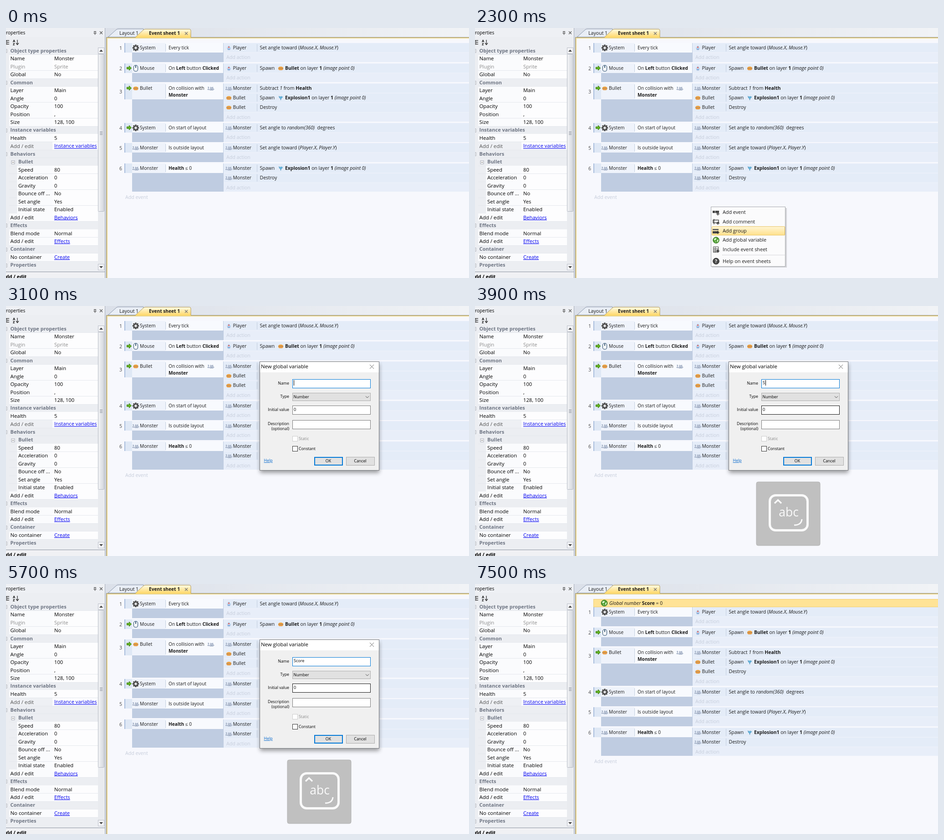
An HTML page that plays this animation: 1017 px wide and 550 px high, repeating every 8000 ms.

```html
<!DOCTYPE html>
<html lang="en">
<head>
<meta charset="utf-8">
<title>Adding a global variable</title>
<style>
  html, body { margin: 0; width: 100%; height: 100%; overflow: hidden; background: #f7f8fd; }
  svg { display: block; width: 100vw; height: 100vh; font-family: "Open Sans", "Noto Sans", sans-serif; fill: #1a1a1a; }
  .b { font-weight: 700; }
  .i { font-style: italic; }
  .link { fill: #00e; text-decoration: underline; }
  .cjk { font-family: "Noto Sans CJK SC", "Noto Sans CJK", sans-serif; }
  #panel, #dialog { fill: #000; }
</style>
</head>
<body>
<svg id="stage" viewBox="0 0 1017 550" xmlns="http://www.w3.org/2000/svg"></svg>
<script>
const LOOP = 8000;

const rect = (x, y, w, h, fill, extra = '') =>
  `<rect x="${x}" y="${y}" width="${w}" height="${h}" fill="${fill}" ${extra}/>`;
const box = (x, y, w, h, fill, stroke, extra = '') =>
  rect(x + .5, y + .5, w - 1, h - 1, fill, `stroke="${stroke}" ${extra}`);
const path = (d, stroke, extra = '') => `<path d="${d}" fill="none" stroke="${stroke}" ${extra}/>`;
const icon = (name, x, y) => `<use href="#${name}" x="${x}" y="${y}"/>`;
// y is the middle of the line; *bold* and _italic_ mark runs
const text = (x, y, s, size = 10.3, extra = '') =>
  `<text x="${x}" y="${y + size * .34}" font-size="${size}" ${extra}>${s
    .replace(/\*(.+?)\*/g, '<tspan class="b">$1</tspan>')
    .replace(/_(.+?)_/g, '<tspan class="i">$1</tspan>')}</text>`;

function defs() {
  const teeth = [0, 45, 90, 135].map(a =>
    rect(-1.6, -7.2, 3.2, 14.4, '#444', `transform="rotate(${a})"`)).join('');
  return `<defs>
    <linearGradient id="tabFill" x2="0" y2="1"><stop stop-color="#fffbe4"/><stop offset="1" stop-color="#ffd766"/></linearGradient>
    <linearGradient id="strip"><stop stop-color="#dbe0e9"/><stop offset="1" stop-color="#f1f3f6"/></linearGradient>
    <linearGradient id="thumb"><stop stop-color="#f4f5f7"/><stop offset="1" stop-color="#d3d6dc"/></linearGradient>
    <linearGradient id="hot" x2="0" y2="1"><stop stop-color="#fff6d6"/><stop offset="1" stop-color="#ffe08a"/></linearGradient>
    <filter id="soft" x="-20%" y="-20%" width="140%" height="140%"><feGaussianBlur stdDeviation="5"/></filter>
    <g id="gear">${teeth}<circle r="5.2" fill="#444"/><circle r="3.4" fill="#999"/><circle r="2" fill="#f3f5fb"/></g>
    <g id="mouse"><rect x="-4.5" y="-6.5" width="9" height="13" rx="4" fill="#fff" stroke="#3f5f7d" stroke-width="1.3"/><path d="M0-6V-1" stroke="#3f5f7d" stroke-width="2"/></g>
    <g id="burger"><path d="M-5.500-.5Q-5-4 0-4T5.500-.5Z" fill="#f0a646"/><path d="M-5.500 0H5.500" stroke="#a5651f" stroke-width="1.2"/><path d="M-5.500 .8H5.500Q5 4 2 4H-2Q-5 4-5.500 .8Z" fill="#e8973a"/></g>
    <g id="monster" fill="none" stroke="#8494b0"><path d="M-7-2Q-5-4-4-2L-7 3H-2L0-3 2 0 4-3 5 1 7 2 5 4H-2" fill="#d3dae6"/><path d="M0 2H4" stroke="#6e7f9e"/></g>
    <g id="player"><path d="M0-4.500L3.500 0 2 4.500H-2L-3.500 0Z" fill="#dce9f8" stroke="#86a6d0" stroke-width=".8"/><circle cy="-1.500" r="1.500" fill="#dd554d"/><path d="M-2 2.500H2" stroke="#4d88cc" stroke-width="1.500"/></g>
    <g id="boom"><path d="M-4-4L-1-2 1-4 2-2 4-3 3 0 1 1 0 5-1 1-3 0Z" fill="#62b5dc" stroke="#3d86b5" stroke-width=".6"/></g>
    <g id="arrow"><path d="M-5-2H0V-5L5 0 0 5V2H-5Z" fill="#63b521" stroke="#39780f"/></g>
    <g id="globe"><circle r="6.8" fill="#4f9e32" stroke="#2f6d1d"/><path d="M-5-2Q-2-6 1-4L0-1-3 1ZM2 0L5-2 5 2 2 5ZM-3 3L0 3-1 5Z" fill="#d4efc5"/></g>
  </defs>`;
}

// Properties panel: kind h = header, l = link value, g = greyed, s = indented
const props = [
  ['Object type properties', '', 'h'], ['Name', 'Monster'], ['Plugin', 'Sprite', 'g'], ['Global', 'No'],
  ['Common', '', 'h'], ['Layer', 'Main'], ['Angle', '0'], ['Opacity', '100'], ['Position', ','], ['Size', '128, 100'],
  ['Instance variables', '', 'h'], ['Health', '5'], ['Add / edit', 'Instance variables', 'l'],
  ['Behaviors', '', 'h'], ['Bullet', '', 'hs'], ['Speed', '80', 's'], ['Acceleration', '0', 's'], ['Gravity', '0', 's'],
  ['Bounce off ...', 'No', 's'], ['Set angle', 'Yes', 's'], ['Initial state', 'Enabled', 's'], ['Add / edit', 'Behaviors', 'l'],
  ['Effects', '', 'h'], ['Blend mode', 'Normal'], ['Add / edit', 'Effects', 'l'],
  ['Container', '', 'h'], ['No container', 'Create', 'l'], ['Properties', '', 'h']
];

function panel() {
  const fold = (x, y) => box(x - 4, y - 4, 8, 8, '#fff', '#a3a8b3') + path(`M${x - 2} ${y}H${x + 2}`, '#666');
  let s = rect(0, 0, 217, 550, '#eceef2') + rect(0, 0, 217, 20, '#eef0f4') +
    text(-6, 10.5, 'Properties', 10) +
    path('M193 7.500H198M194 7V12M197 7V12M192.500 12H198.500M195.500 12V15M206 7.500L212 13.500M212 7.500L206 13.500', '#555', 'stroke-width="1.2"') +
    path('M0 27.500H7M2 31.500H7M2 35.500H7M1.500 28V37', '#444', 'stroke-width="1.3"') +
    text(15, 28, 'A', 7.5, 'class="b"') + text(15, 35, 'Z', 7.5, 'class="b"') +
    path('M25 26V36M22 33L25 37 28 33', '#333', 'stroke-width="1.3"');
  props.forEach(([name, value, kind = ''], k) => {
    const y = 50 + 17.47 * k, top = Math.round(y - 8.7), head = kind.includes('h'), sub = kind.includes('s');
    if (!head) {
      const left = sub ? 24 : 7;
      s += rect(left, top, 202 - left, 17, k === 12 ? '#eef0f4' : '#fafbfd') + rect(102, top, 100, 17, '#fdfdfe');
    }
    s += path(`M7 ${top + 17.5}H202`, '#e5e8ed') +
      text(sub ? 27 : 9.5, y, name, head ? 11 : 11.4, head ? 'class="b" fill="#6e7583"' : kind === 'g' ? 'fill="#8b8b8b"' : k === 12 ? 'fill="#555"' : '');
    if (value) s += text(106, y, value, 11.2, kind === 'l' ? 'class="link"' : kind === 'g' ? 'fill="#8b8b8b"' : '');
    if (head) s += fold(sub ? 15.5 : -1.5, Math.round(y) + .5);
  });
  s += rect(202, 42, 15, 491, '#e9ebef') + box(202, 43, 14, 14, '#f3f4f7', '#bcc1ca') +
    '<path d="M205 52L209 47.500 213 52Z" fill="#444"/>' +
    box(202, 57, 14, 347, 'url(#thumb)', '#b3b8c2', 'rx="1"') + path('M206 228.500H212M206 231.500H212M206 234.500H212', '#858b96') +
    box(202, 519, 14, 14, '#f3f4f7', '#bcc1ca') + '<path d="M205 524L209 528.500 213 524Z" fill="#444"/>' +
    rect(0, 530, 202, 7, '#eceef2') + path('M0 536.500H217', '#8b93a1') + rect(0, 537, 217, 13, '#f0f1f4') +
    text(-8, 547, 'Add / edit', 11, 'class="b"') + path('M217.500 0V550', '#a5adba') + rect(218, 0, 4, 550, '#dbe0e9');
  return `<g id="panel">${s}</g>`;
}

function tabs() {
  return rect(222, 0, 795, 21, 'url(#strip)') +
    '<path d="M224 20L243 3Q245 2 248 2H302V20Z" fill="#e9eef6" stroke="#8794a8"/>' +
    path('M1017 20.500H220.500V550', '#8d8a78') + path('M1017 22H222V550', '#ead58c', 'stroke-width="2"') +
    '<path d="M284 21L302 4Q304 2.500 307 2.500H403Q406 2.500 406 6V21Z" fill="url(#tabFill)"/>' +
    path('M284 20.500L302 4Q304 2.500 307 2.500H403Q406 2.500 406 6V20.500', '#b39a55') +
    text(249, 11.5, 'Layout 1', 10.6) + text(314, 11.5, 'Event sheet 1', 10.2, 'class="b"') +
    path('M393 9L399 15M399 9L393 15', '#777', 'stroke-width="1.3"');
}

// Event sheet rows
const explode = ['monster', 'Monster', 'Spawn', 'boom', '*Explosion1* on layer *1* _(image point 0)_'];
const events = [
  { y: 33, h: 42, who: ['gear', 'System'], when: 'Every tick', acts: [['player', 'Player', 'Set angle toward (_Mouse.X_, _Mouse.Y_)']] },
  { y: 78, h: 41, go: 1, who: ['mouse', 'Mouse'], when: 'On *Left* button *Clicked*', id: 'hintA',
    acts: [['player', 'Player', 'Spawn', 'burger', '*Bullet* on layer *1* _(image point 0)_']] },
  { y: 122, h: 84, go: 1, who: ['burger', 'Bullet'], when: 'On collision with', tall: 1,
    acts: [['monster', 'Monster', 'Subtract _1_ from *Health*'], ['burger', 'Bullet', ...explode.slice(2)], ['burger', 'Bullet', 'Destroy']] },
  { y: 209, h: 42, go: 1, who: ['gear', 'System'], when: 'On start of layout', acts: [['monster', 'Monster', 'Set angle to _random(360)_ &#160;degrees']] },
  { y: 253, h: 42, who: ['monster', 'Monster'], when: 'Is outside layout', acts: [['monster', 'Monster', 'Set angle toward (_Player.X_, _Player.Y_)']] },
  { y: 298, h: 62, who: ['monster', 'Monster'], when: '*Health* ≤ 0', id: 'hintB', acts: [explode, ['monster', 'Monster', 'Destroy']] }
];

function eventRow(e, k) {
  const cell = e.tall ? 35 : 21, mid = e.y + 10.7;
  let s = rect(478, e.y, 539, e.h, '#e8eef9') + rect(277, e.y, 201, e.h, '#bfcce1') +
    rect(260, e.y, 17, cell, '#dfe8f5') + rect(260, e.y, 2, cell, '#a9bddd') +
    rect(277, e.y, 200, cell, '#f8fafe') + rect(277, e.y, 73, cell, '#eff3fb') +
    path(`M350.500 ${e.y + 2}v${cell - 4}`, '#c3cede') +
    text(255, e.y + cell / 2 + .7, `${k + 1}`, 10.5, 'text-anchor="end" fill="#444"') +
    (e.go ? icon('arrow', 270.5, mid - .5) : '') + icon(e.who[0], 285, mid) +
    text(294, mid, e.who[1], 10.2) + text(357, mid, e.when, 10.2);
  if (e.tall) s += icon('monster', 450, mid) + text(357, mid + 14.5, 'Monster', 10.2, 'class="b"');
  e.acts.forEach(([pic, obj, verb, pic2, rest], n) => {
    const y = mid + 21.1 * n;
    s += rect(479, y - 10, 538, 20, '#e4ecf8') + path(`M479 ${y + 10.5}H1017`, '#f0f4fb') +
      path(`M551.500 ${y - 8}v16`, '#c3cede') + icon(pic, 489.5, y) + text(498.5, y, obj) + text(557.5, y, verb, 10.5);
    if (pic2) s += icon(pic2, 603.5, y) + text(613, y, rest, 10.4);
  });
  return s + text(484, mid + 21.1 * e.acts.length, 'Add action', 10.6, `fill="#c6cddb" ${e.id ? `id="${e.id}"` : ''}`);
}

const sheet = () => `<g id="sheet">${events.map(eventRow).join('')}${text(262, 372, 'Add event', 10.6, 'fill="#c6cddb"')}</g>`;

const globalRow = () => `<g id="global">${box(260, 33, 758, 18, '#ffe396', '#f0cf75') + icon('globe', 284, 42) +
  text(295, 42.5, '_Global number_ *Score* = 0', 10.4)}</g>`;

function menu() {
  const items = ['Add event', 'Add comment', 'Add group', 'Add global variable', 'Include event sheet'];
  const plus = y => path(`M530 ${y + 3.5}h7M533.500 ${y}v7`, '#333', 'stroke-width="1.6"');
  const y = k => 405.5 + 20.4 * k;
  return `<g id="menu">${rect(520, 396, 165, 131, '#000', 'opacity=".14"') + box(518, 393, 164, 132, '#fbfbfc', '#a7a9ad')}
    <rect id="hover" x="520.500" width="160" height="19" rx="1" fill="url(#hot)" stroke="#e9c25c"/>` +
    items.map((s, k) => text(544, y(k), s, 10.8)).join('') +
    rect(522, 402, 14, 5, '#444') + path('M527.500 402V407', '#ccc') + plus(y(0)) +
    path('M523 422.500H535V428.500H523ZM525 420V432', '#444', 'stroke-width="1.4"') + plus(y(1)) +
    rect(522, 442, 13, 3, '#666') + rect(522, 447, 13, 5, '#444') + plus(y(2)) + icon('globe', 529.5, y(3)) +
    box(523, 481, 12, 13, '#fff', '#444') + path('M524 485.500H534M524 488.500H534M524 491.500H534M527.500 482V493', '#444') + plus(y(4)) +
    path('M543 499.500H680', '#c5c7cb', 'stroke-dasharray="2 1"') +
    '<circle cx="529.500" cy="513" r="6.800" fill="#4a4a4a" stroke="#222"/>' +
    text(529.5, 513.3, '?', 10, 'class="b" fill="#fff" text-anchor="middle"') + text(544, 513.5, 'Help on event sheets', 10.8) + '</g>';
}

function dialog() {
  const label = (y, s) => text(622, y, s, 8.8, 'text-anchor="end"');
  return `<g id="dialog">${rect(558, 127, 262, 240, '#000', 'opacity=".38" filter="url(#soft)"') +
    box(557, 122, 263, 240, '#f0f0f0', '#77797d') + rect(558, 123, 261, 23, '#fff') +
    text(560, 133.5, 'New global variable', 11.4) + path('M799 129L808 138M808 129L799 138', '#555', 'stroke-width=".9"') +
    label(170, 'Name') + label(199.5, 'Type') + label(228.5, 'Initial value') + label(259, 'Description') + label(270, '(optional)') +
    box(629, 161, 172, 20, '#fff', '#0078d7') + box(629, 191, 172, 18, '#e1e1e1', '#adadad') +
    text(631.5, 200.5, 'Number', 8.8) + path('M790 198.500L793.500 202 797 198.500', '#444') +
    box(629, 219, 172, 20, '#fff', '#7a7a7a', 'id="initial"') + text(632, 227.5, '0', 9) +
    box(629, 251, 172, 20, '#fff', '#7a7a7a') +
    box(629, 286, 12, 12, '#fff', '#ccc') + text(643, 292.5, 'Static', 8.8, 'fill="#8a8a8a"') +
    box(629, 308, 12, 12, '#fff', '#333') + text(643, 314, 'Constant', 8.8) +
    text(566.5, 340, 'Help', 8.8, 'fill="#0066cc" text-decoration="underline"') +
    box(677, 332, 63, 19, '#e1e1e1', '#0078d7', 'id="ok"') + box(678, 333, 61, 17, 'none', '#0078d7', 'id="okRim"') +
    box(747, 332, 63, 19, '#e1e1e1', '#adadad') +
    text(708, 341.5, 'OK', 8.8, 'text-anchor="middle"') + text(778, 341.5, 'Cancel', 8.8, 'text-anchor="middle"') +
    text(632, 169, ' ', 9.1, 'id="typed"') + rect(0, 163, 1, 12, '#000', 'id="caret"')}</g>`;
}

function capsBadge() {
  return `<g id="caps">${rect(618, 387, 140, 140, '#c0c0c0', 'rx="4" stroke="#b2b2b2"')}
    <rect x="647.500" y="416.500" width="83" height="77" rx="13" fill="#bdbdbd" stroke="#fafafa" stroke-width="5"/>` +
    path('M658 434L665.500 427 673 434', '#fafafa', 'stroke-width="3.500"') +
    path('M701 482Q717 482 718 469', '#fafafa', 'stroke-width="3"') +
    text(689, 454, 'abc', 26.5, 'fill="#fafafa" text-anchor="middle"') + '</g>';
}

function candidates(list) {
  let x = 635, s = rect(634.5, 179.5, 400, 39, '#fff', 'stroke="#7fb5e6"');
  list.split(' ').forEach((word, k) => {
    const w = word.length * 16 + 39.6;
    if (!k) s += rect(x, 180, w, 39, '#0078d7');
    s += text(x + 15, 202, `${k + 1}`, 10.5, `fill="${k ? '#777' : '#fff'}"`) +
      text(x + 24.5, 200, word, 16.2, `class="cjk" fill="${k ? '#111' : '#fff'}"`);
    x += w;
  });
  return s;
}

const stage = document.getElementById('stage');
stage.innerHTML = defs() + rect(222, 21, 795, 529, '#f7f8fd') + sheet() + globalRow() + panel() + tabs() +
  menu() + dialog() + capsBadge() + '<g id="ime"></g>';
const el = {};
stage.querySelectorAll('g[id], rect[id], text[id]').forEach(n => el[n.id] = n);

// Timelines: [start, value] pairs, each held until the next
const tracks = {
  typed: [[0, ''], [3600, 'S'], [4300, 'Sc'], [4500, 'Sco'], [4700, "Sco'r"], [4900, "Sco're"], [5200, 'Score']],
  ime: [[0, ''], [4300, '才 从 出 次 车 错 层'], [4500, '从 凑 错 粗 次 从来 丛'],
    [4700, '从容 从人 从戎 凑人 苁蓉 从软'], [4900, '从热 凑热 从惹 错热 从额 粗热'], [5200, '']],
  caret: [[0, 0], [3100, 632], [3600, 638], [4300, 0], [5200, 656], [5700, 0], [6200, 656], [6700, 0]],
  hover: [[0, -1], [2100, 0], [2200, 1], [2300, 2], [2400, 3]],
  dialog: [[0, 0], [2900, .35], [3000, .8], [3100, 1], [7000, .4], [7100, 0]],
  caps: [[0, 0], [3300, .3], [3400, .6], [3500, .85], [3600, 1], [5900, .8], [6000, .6], [6100, .4], [6200, .2], [6300, 0]],
  initial: [[0, '#7a7a7a'], [3700, '#171717'], [5900, '#7a7a7a']],
  ok: [[0, '#e1e1e1'], [6400, '#e5f1fb'], [6900, '#cce4f7']],
  okEdge: [[0, '#0078d7'], [6900, '#005499']]
};
const at = (name, t) => tracks[name].filter(([start]) => start <= t).pop()[1];
const show = (node, on) => node.setAttribute('visibility', on ? 'visible' : 'hidden');
const within = (t, a, b) => t >= a && t < b;

let imeList;
function render(t) {
  const added = t >= 7000, hover = at('hover', t), d = at('dialog', t), caret = at('caret', t), list = at('ime', t);
  const menuOn = within(t, 1800, 2800);
  el.sheet.setAttribute('transform', `translate(0 ${added ? 18 : 0})`);
  show(el.global, added);
  show(el.menu, menuOn);
  show(el.hover, menuOn && hover >= 0);
  el.hover.setAttribute('y', 396 + 20.4 * Math.max(hover, 0));
  const scale = .94 + .06 * d;
  el.dialog.setAttribute('opacity', d);
  el.dialog.setAttribute('transform', `translate(688 242) scale(${scale}) translate(-688 -242)`);
  el.typed.textContent = at('typed', t);
  el.caret.setAttribute('x', caret);
  show(el.caret, caret);
  el.caps.setAttribute('opacity', at('caps', t));
  el.initial.setAttribute('stroke', at('initial', t));
  el.ok.setAttribute('fill', at('ok', t));
  el.ok.setAttribute('stroke', at('okEdge', t));
  show(el.okRim, t < 6400);
  el.hintA.setAttribute('fill', within(t, 100, 200) ? '#b4bccb' : '#c6cddb');
  el.hintB.setAttribute('fill', within(t, 7400, 7500) ? '#b4bccb' : '#c6cddb');
  if (list !== imeList) el.ime.innerHTML = list ? candidates(list) : '';
  imeList = list;
}

const begin = performance.now();
function tick() {
  render((performance.now() - begin) % LOOP);
  requestAnimationFrame(tick);
}
tick();
</script>
</body>
</html>
```
